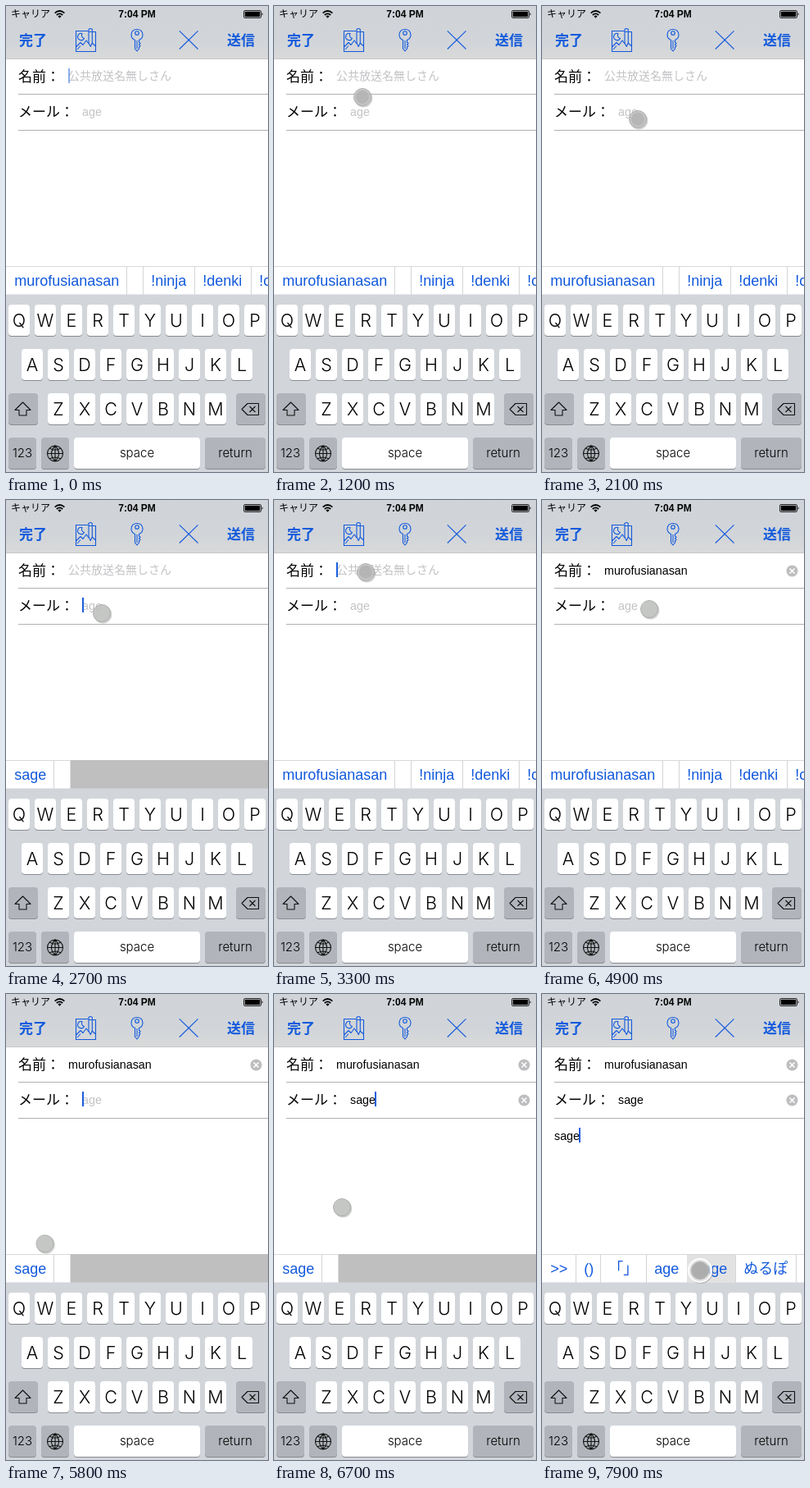
Animation of 320 by 568 pixels, one loop 8000 ms. Source, as an HTML page:

```html
<!DOCTYPE html>
<html lang="ja">
<head>
<meta charset="utf-8">
<style>
html, body { margin: 0; width: 100%; height: 100%; overflow: hidden; background: #fff; }
svg { display: block; width: 320px; height: 568px; }
text { font-family: "Liberation Sans", "Noto Sans CJK JP", "Noto Sans CJK", Arial, sans-serif; white-space: pre; }
.jp { font-family: "Noto Sans CJK JP", "Noto Sans CJK", sans-serif; font-size: 17px; }
.bold { font-weight: 700; }
.blue { fill: #1259dc; }
.icon { fill: none; stroke: #1259dc; stroke-width: 1.1; stroke-linejoin: round; }
.field { font-size: 14.3px; }
.hint { fill: #c3c3c6; }
.cell { font-size: 18px; }
.key { font-family: Inter, "Liberation Sans", sans-serif; font-weight: 300; text-anchor: middle; }
.glyph { fill: none; stroke: #111; stroke-width: 1.1; stroke-linejoin: round; }
</style>
</head>
<body>
<svg id="stage" viewBox="0 0 320 568" xmlns="http://www.w3.org/2000/svg">
  <defs>
    <linearGradient id="nav" x2="0" y2="1">
      <stop offset="0" stop-color="#d0d4d9"/><stop offset=".65" stop-color="#d1d5d9"/><stop offset="1" stop-color="#d9d9d9"/>
    </linearGradient>
  </defs>
  <rect width="320" height="568" fill="#fff"/>
  <rect width="320" height="65" fill="url(#nav)"/>
  <rect y="64.5" width="320" height=".5" fill="#b5b5b5"/>

  <text class="jp" x="6" y="14" style="font-size:12px">キャリア</text>
  <g fill="none" stroke="#000" stroke-width="1.7">
    <path d="M59.6 8.6Q65.5 3.4 71.4 8.6M61.8 11Q65.5 7.8 69.2 11"/>
  </g>
  <path d="M63.4 12.4Q65.5 10.8 67.6 12.4L65.5 14.8Z"/>
  <text class="bold" x="160" y="14.3" font-size="12" text-anchor="middle" textLength="">7:04 PM</text>
  <rect x="290.5" y="5.5" width="21" height="9" rx="1.5" fill="none" stroke="#000" stroke-width=".8"/>
  <rect x="291.8" y="6.8" width="18.4" height="6.4" rx=".5"/>
  <path d="M312.6 8.3Q314.6 10 312.6 11.7Z"/>

  <text class="jp bold blue" x="16" y="47.6">完了</text>
  <text class="jp bold blue" x="270" y="47.6">送信</text>
  <g class="icon">
    <path d="M100.5 30.5H85.5V55.5H109.5V31.5H106M85.5 50L91 44.5L94 47.5L98 42L101 46M105 45L109.5 49M87 53L91 48.5"/>
    <path d="M93 33.5A4.2 4.2 0 1 0 95.5 39.5A4 4 0 0 1 93 33.5Z"/>
    <path d="M101 28.5Q103.2 26.5 105.3 28.5V45L103.2 49.5L101 45ZM101 31.5H105.3"/>
    <path d="M157.5 41.6Q152.8 39.5 153 35Q153.5 28.5 160 28.5Q166.5 28.5 167 35Q167.2 39.5 162.5 41.6V44L164 45.5L162.5 47L164 48.5L162.5 50V52L160 55L157.5 52Z"/>
    <circle cx="160" cy="33" r="2.3"/>
    <path d="M160 42V52M211.8 30.3L234.5 52.5M234.5 30.3L211.8 52.5"/>
  </g>

  <text class="jp" x="15" y="92">名前：</text>
  <text class="jp" x="15" y="135">メール：</text>
  <path d="M15 107.5H320M15 151.5H320" stroke="#b0b0b0"/>
  <text id="nameHint" class="jp hint" x="76" y="90.3" style="font-size:14px">公共放送名無しさん</text>
  <text id="mailHint" class="field hint" x="93" y="134">age</text>
  <text id="name" class="field" x="76" y="91">murofusianasan</text>
  <text id="mail" class="field" x="93" y="134">sage</text>
  <text id="body" class="field" x="15" y="178">sage</text>
  <g id="clears"></g>
  <rect id="caret" width="2" height="18" fill="#1a5fdc"/>

  <g id="bars"></g>
  <rect y="351.5" width="320" height="216.5" fill="#d2d6db"/>
  <g id="keys"></g>

  <g id="touch">
    <circle id="shadow" cx="1.3" cy="1.5" r="11" fill="#777" opacity=".35"/>
    <circle id="halo" r="14" fill="#f4f4f4" fill-opacity=".6" stroke="#fff" stroke-width="2"/>
    <circle id="disc" r="10.5" fill="#c3c5c3" fill-opacity=".86" stroke="#a9aaa9" stroke-width=".9"/>
    <circle id="core" r="8" fill="#a3a3a3"/>
  </g>
</svg>
<script>
const LOOP = 8000, STEP = 100;
const $ = id => document.getElementById(id);

function add(parent, tag, attrs, text) {
  const el = document.createElementNS('http://www.w3.org/2000/svg', tag);
  for (const k in attrs) el.setAttribute(k, attrs[k]);
  if (text) el.textContent = text;
  parent.appendChild(el);
  return el;
}
const show = (el, on) => el.setAttribute('visibility', on ? 'visible' : 'hidden');
const clamp = v => Math.max(0, Math.min(1, v));

// Clear buttons
function clearButton(y) {
  const g = add($('clears'), 'g', { transform: `translate(305.5 ${y})` });
  add(g, 'circle', { r: 7, fill: '#bebec0' });
  add(g, 'path', { d: 'M-3-3L3 3M3-3L-3 3', stroke: '#fff', 'stroke-width': 1.5 });
  return g;
}
const clearName = clearButton(86.5), clearMail = clearButton(129.5);

// Suggestion bars: label and right edge of each cell
function makeBar(cells, end, pressed) {
  const g = add($('bars'), 'g', {});
  add(g, 'rect', { y: 317, width: 320, height: 35, fill: '#bfbfbf' });
  add(g, 'rect', { y: 317, width: end, height: 35, fill: '#fff' });
  let x = 0, hot;
  cells.forEach(([label, right], i) => {
    if (i === pressed) hot = add(g, 'rect', { x, y: 318, width: right - x, height: 33.5, fill: '#e2e2e2' });
    const jp = /[ぁ-ん「]/.test(label);
    add(g, 'text', { class: jp ? 'cell jp blue' : 'cell blue', x: x + 10.3, y: 341,
      style: jp ? 'font-size:18px' : '' }, label);
    if (right < 320) add(g, 'path', { d: `M${right + .5} 317V352`, stroke: '#d3d5d8' });
    x = right;
  });
  add(g, 'path', { d: `M0 317.5H${end}`, stroke: '#d8d8d8' });
  return { g, hot };
}
const bars = {
  name: makeBar([['murofusianasan', 147], ['', 167], ['!ninja', 230], ['!denki', 299], ['!chkBBx', 380]], 320, 0),
  mail: makeBar([['sage', 58]], 78.5, 0),
  body: makeBar([['>>', 41], ['()', 71], ['「」', 127], ['age', 177], ['sage', 236], ['ぬるぽ', 310]], 320, 4)
};

// Keyboard
function key(x, y, w, label, size, dark) {
  add($('keys'), 'rect', { x, y: y + 1, width: w, height: 38, rx: 4, fill: '#888b90' });
  add($('keys'), 'rect', { x, y, width: w, height: 38, rx: 4, fill: dark ? '#b1b5bb' : '#fff' });
  add($('keys'), 'text', { class: 'key', x: x + w / 2, y: y + (size > 18 ? 27 : 24), 'font-size': size }, label);
}
[['QWERTYUIOP', 3], ['ASDFGHJKL', 19], ['ZXCVBNM', 51]].forEach(([row, x], r) =>
  [...row].forEach((c, i) => key(x + i * 32, 364 + r * 54, 26, c, 21.5)));
key(3, 472, 36, '', 15, true);
key(281, 472, 36, '', 15, true);
key(3, 526, 34, '123', 15, true);
key(43, 526, 34, '', 15, true);
key(83, 526, 154, 'space', 15);
key(243, 526, 74, 'return', 15, true);
const glyph = d => add($('keys'), 'path', { class: 'glyph', d });
glyph('M20.5 483L30 492.5H25V499H16V492.5H11Z');
glyph('M288 491.5L295 484.5H308.5V498.5H295ZM297.5 488L304.5 495M304.5 488L297.5 495');
glyph('M50.5 545.5a9.5 9.5 0 1 0 19 0a9.5 9.5 0 1 0-19 0H69.5M60 536V555' +
  'M60 536Q51 545.5 60 555Q69 545.5 60 536M53 539Q60 543 67 539M53 552Q60 548 67 552');

// Pointer stops: time, x, y
const path = [
  [500, 118, 536], [900, 104, 328], [1200, 108, 111], [1600, 116, 134], [2000, 117, 138], [2700, 117, 138],
  [3100, 112, 88], [3400, 112, 88], [4000, 102, 336], [4400, 102, 336], [4900, 131, 133], [5350, 131, 133],
  [5950, 32, 336], [6300, 32, 336], [6650, 83, 260], [6850, 83, 260], [7500, 193, 337], [8000, 193, 337]
];
const taps = [1300, 2200, 3200, 4200, 5250, 6200, 6840, 7870];

function pointer(t) {
  const i = Math.max(0, path.findLastIndex(p => p[0] <= t));
  const [t0, x0, y0] = path[i], [t1, x1, y1] = path[Math.min(i + 1, path.length - 1)];
  const u = clamp((t - t0) / (t1 - t0 || 1)), e = u * u * (3 - 2 * u);
  return [x0 + (x1 - x0) * e, y0 + (y1 - y0) * e];
}

// Caret stops: time of focus or typing, x, y
const carets = [
  [-550, 76, 76], [2300, 93, 119], [3300, 76, 76], [4300, 178, 76],
  [5300, 93, 119], [6300, 123, 119], [6800, 15, 163], [7800, 45, 163]
];
function blink(u) {
  u %= 1000;
  return u < 600 ? clamp((600 - u) / 100) : clamp((u - 900) / 100);
}

function draw(t) {
  const named = t >= 4300, mailed = t >= 6300;
  show($('name'), named);
  show($('nameHint'), !named);
  show(clearName, named);
  show($('mail'), mailed);
  show($('mailHint'), !mailed);
  show(clearMail, mailed);
  show($('body'), t >= 7800);

  const c = carets.findLast(k => k[0] <= t);
  $('caret').setAttribute('x', c[1]);
  $('caret').setAttribute('y', c[2]);
  $('caret').setAttribute('opacity', blink(t - c[0]));

  const focus = t >= 6800 ? 'body' : (t >= 2300 && t < 3300) || t >= 5300 ? 'mail' : 'name';
  for (const k in bars) bars[k].g.setAttribute('display', k === focus ? 'inline' : 'none');
  bars.name.hot.setAttribute('opacity', t >= 4200 && t < 4400 ? 1 : 0);
  bars.mail.hot.setAttribute('opacity', t >= 6200 && t < 6400 ? 1 : 0);
  bars.body.hot.setAttribute('opacity', t >= 7700 ? 1 : 0);

  const [x, y] = pointer(t);
  const p = Math.max(...taps.map(k => clamp(1.33 - Math.abs(t - k) / 100)));
  show($('touch'), t >= 500);
  $('touch').setAttribute('transform', `translate(${x.toFixed(2)} ${y.toFixed(2)})`);
  $('halo').setAttribute('opacity', clamp(p * 2 - .7));
  $('shadow').setAttribute('r', 11 + 3.5 * clamp(p * 2 - .7));
  $('core').setAttribute('r', 7 + 3 * p);
  $('core').setAttribute('opacity', clamp(p * 2) * .75);
}

function frame(now) {
  draw(Math.floor((now % LOOP) / STEP) * STEP);
  requestAnimationFrame(frame);
}
draw(0);
requestAnimationFrame(frame);
</script>
</body>
</html>
```
